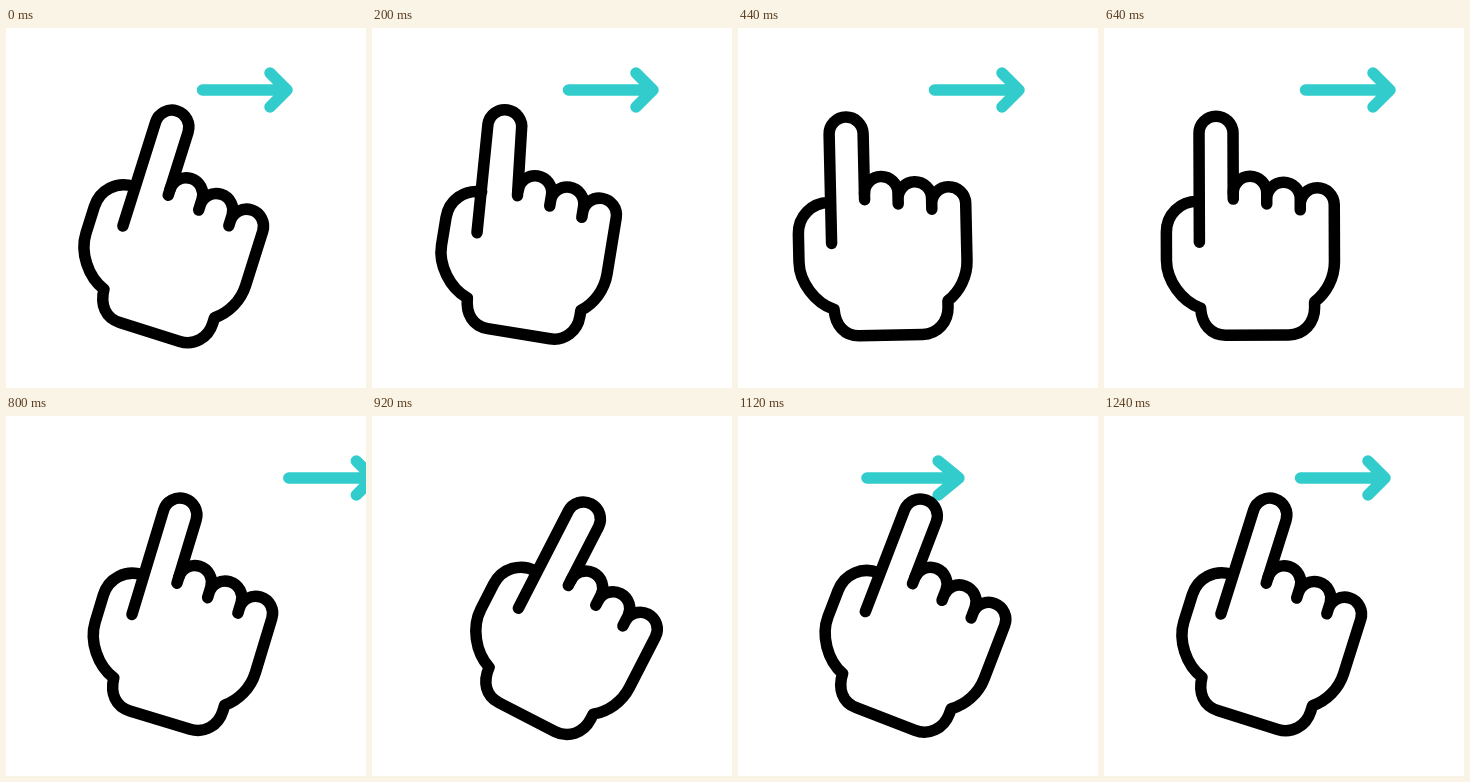
These frames come from a looping animation (360 by 360 pixels, 1.48 s). An HTML page:

```html
<!DOCTYPE html>
<html lang="en">
<head>
<meta charset="utf-8">
<title>Swipe right</title>
<style>
  html, body { margin: 0; width: 100%; height: 100%; overflow: hidden; background: #fff; }
  svg { display: block; width: 100vw; height: 100vh; }
  path { fill: none; stroke-width: 11.5; stroke-linecap: round; stroke-linejoin: round; }
</style>
</head>
<body>
<svg viewBox="0 0 360 360">
  <path id="arrow" stroke="#33cccc"/>
  <g id="hand" stroke="#000">
    <path id="finger"/>
    <path d="M129 165a16.750 16.750 0 0 1 33.500 0V176M162.500 171a16.750 16.750 0 0 1 33.500 0V182
      M196 177a17 17 0 0 1 34 0V234C230 250 222 265 210 274V280C210 295 199 307 184 307
      H121C106 307 97 296 96 280C77 273 62 252 62 232V204C62 186 76 173 93 173"/>
  </g>
</svg>
<script>
const LOOP = 1480, STEP = 40;
const REST = 17.5, BACK = -1.3, PEAK = 27.5, PEAK_SHIFT = 15.8;
const [arrow, hand, finger] = ['arrow', 'hand', 'finger'].map(id => document.getElementById(id));

const progress = (t, from, to) => Math.min(1, Math.max(0, (t - from) / (to - from)));
const smooth = p => p * p * (3 - 2 * p);
const mix = (a, b, p) => a + (b - a) * p;

function handPose(t) {
  if (t < 600) {
    const p = progress(t, 40, 440), wave = Math.sin(Math.PI * p);
    return { angle: mix(REST, BACK, smooth(p ** 0.85)), shift: -wave, bend: -7 * wave };
  }
  const out = smooth(progress(t, 600, 940)), home = smooth(progress(t, 940, 1240));
  return {
    angle: mix(mix(BACK, PEAK, out), REST, home),
    shift: PEAK_SHIFT * (out - home),
    bend: 0
  };
}

// Leaves on the right while speeding up, comes back from the left slowing down,
// stretched in proportion to the distance left to travel.
function arrowPath(t) {
  const n = progress(t, 600, 1240) * 16;
  const leaving = n < 8.5;
  const shift = leaving ? 5 * n ** 1.77 : -161 * ((16 - n) / 5) ** 1.7;
  const stretch = leaving ? 0 : -0.11 * shift;
  const tail = 196.5 + shift, tip = 281 + shift + stretch, wing = 264 + shift + stretch / 2;
  return `M${tail} 62H${tip}M${wing} 45L${tip} 62L${wing} 79`;
}

function draw(now) {
  const t = Math.floor(now % LOOP / STEP) * STEP;
  const { angle, shift, bend } = handPose(t);
  hand.setAttribute('transform', `translate(${shift} 0) rotate(${angle} 158 277)`);
  finger.setAttribute('d', `M95 214L${95 + bend} 105a17 17 0 0 1 34 0L129 171`);
  arrow.setAttribute('d', arrowPath(t));
}

let start;
function tick(now) {
  start ??= now;
  draw(now - start);
  requestAnimationFrame(tick);
}
draw(0);
requestAnimationFrame(tick);
</script>
</body>
</html>
```
